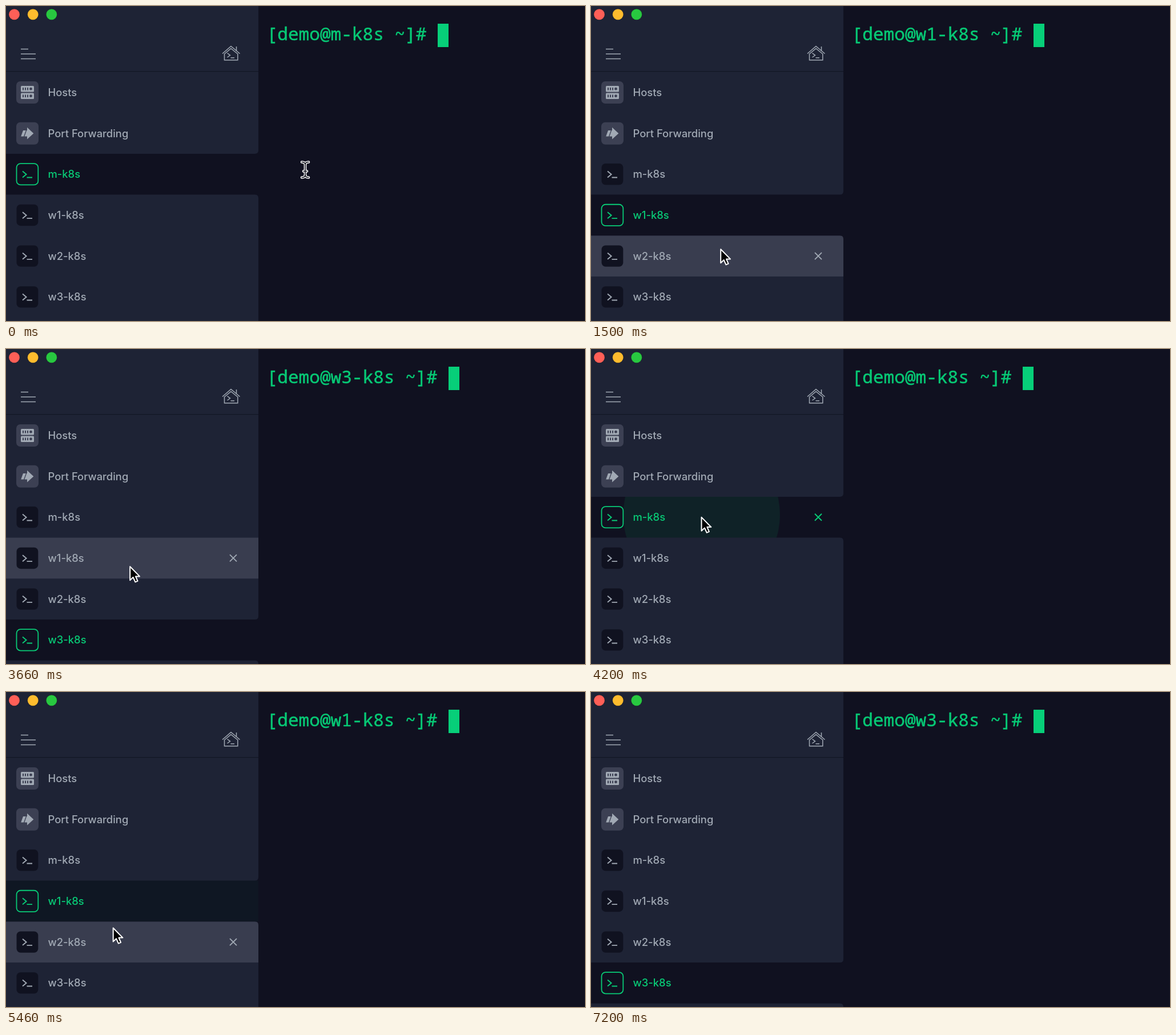
These frames come from a looping animation (1014 by 552 pixels, 7260 ms). An HTML page:

```html
<!DOCTYPE html>
<html lang="en">
<head>
<meta charset="utf-8">
<title>Terminal tabs</title>
<style>
  html, body { margin: 0; width: 100%; height: 100%; overflow: hidden; background: #101120; }
  svg { display: block; width: 100vw; height: 100vh; }
  .label { font: 500 18.4px Inter, sans-serif; fill: currentColor; }
  .prompt {
    font: 400 31.1px "Noto Sans Mono", monospace; white-space: pre;
    fill: #07c975; stroke: #07c975; stroke-width: 0.5;
  }
  .line { fill: none; stroke: currentColor; stroke-width: 1.9; }
  .thin { stroke-width: 1.5; }
  .lights circle { stroke: #000; stroke-opacity: 0.15; }
  .row { color: #a1a9b4; }
  .row .tile { fill: #101220; stroke: none; }
  .row.active { color: #08cb76; }
  .row.active .tile { fill: none; stroke: currentColor; stroke-width: 1.8; }
  .row .close { visibility: hidden; }
  .row.hover .close { visibility: visible; }
</style>
</head>
<body>
<svg viewBox="0 0 1014 552">
  <defs>
    <clipPath id="rowClip"><rect id="clipBox" width="442" height="71.7"/></clipPath>
  </defs>
  <rect width="1014" height="552" fill="#101120"/>
  <rect width="442" height="552" fill="#1e2335"/>
  <rect y="114" width="442" height="1.3" fill="#131725"/>
  <g class="lights">
    <circle cx="14.5" cy="14.8" r="9.5" fill="#ff5f57"/>
    <circle cx="47.2" cy="14.8" r="9.5" fill="#febc2e"/>
    <circle cx="79.8" cy="14.8" r="9.5" fill="#28c840"/>
  </g>

  <g color="#a1a9b4">
    <path class="line thin" d="M26 75.5H39M26 84H52M26 92.5H52"/>
    <path class="line thin" d="M379 83.5L394 70.5L409.5 83.5M403.5 78V71"/>
    <path class="line thin" d="M382.5 94.8V84L394 74.5L405.8 84V94.8Z"/>
    <path class="line thin" d="M387.5 82.5L392.5 86.3L387.5 90M393.5 90.8H400"/>
    <rect x="18" y="132" width="39" height="39" rx="7" fill="#3c4053"/>
    <g id="servers"></g>
    <text class="label" x="73.5" y="158">Hosts</text>
    <rect x="18" y="203.7" width="39" height="39" rx="7" fill="#3c4053"/>
    <path d="M30 218H34.8L31 228.5H26.2ZM36.2 218H37V212.8L48.3 223.2L37 233.6V228.5H32.4Z" fill="currentColor"/>
    <text class="label" x="73.5" y="229.7">Port Forwarding</text>
  </g>

  <rect id="hoverBox" width="442" height="71.7" fill="#393d4f"/>
  <path id="notch" d="M0 0H436Q442 0 442 -6H444V77.7H442Q442 71.7 436 71.7H0Z" fill="#101120"/>
  <g clip-path="url(#rowClip)"><circle id="ripple" fill="#00cc78"/></g>
  <g id="rows"></g>

  <text class="prompt" id="prompt" x="456.6" y="60"></text>
  <rect id="block" y="31" width="19" height="41" fill="#07cf79"/>

  <path id="arrow" d="M1.2 2.3V26.2L6.6 21L10.4 29.4L14.6 27.6L11 19.4H18Z"
        fill="#000" stroke="#fff" stroke-width="2" stroke-linejoin="round"/>
  <g id="beam" fill="none" stroke-linecap="round">
    <path id="beamOuter" stroke="#fff" stroke-width="4.6"/>
    <path id="beamInner" stroke="#10121c" stroke-width="1.6"/>
  </g>
</svg>
<script>
const LOOP = 7260, STEP = 60;
const ROW_H = 71.7, FIRST_TOP = 258.9, SIDEBAR = 442;
const PROMPT_X = 457.6, CHAR_W = 18.66;
const hosts = ["m-k8s", "w1-k8s", "w2-k8s", "w3-k8s"];

// [time, row]
const clicks = [[900, 1], [1980, 2], [2940, 3], [4080, 0], [5040, 1], [5880, 2], [6660, 3]];

// [time, x, y] of the pointer tip
const track = [
  [0, 524, 287], [180, 516, 290], [840, 240, 368], [1080, 228, 374],
  [1500, 226, 424], [1860, 223, 437], [2580, 223, 437], [2880, 222, 504],
  [3180, 222, 504], [3660, 216, 379], [4020, 194, 290], [4260, 192, 293],
  [4620, 184, 365], [5220, 184, 372], [5760, 190, 466], [5900, 191, 470],
  [6120, 191, 511], [6720, 192, 515], [7020, 193, 570], [LOOP, 193, 570]
];

const $ = id => document.getElementById(id);
const rowTop = i => FIRST_TOP + i * ROW_H;
const move = (el, x, y) => el.setAttribute("transform", `translate(${x} ${y})`);
const show = (el, on) => el.setAttribute("visibility", on ? "visible" : "hidden");

$("servers").innerHTML = [140, 152.5].map(y => `
  <rect x="26" y="${y}" width="23" height="10.5" rx="1.5" fill="currentColor"/>
  <path d="M30 ${y + 3}v4.5M34 ${y + 3}v4.5M38 ${y + 3}v4.5" stroke="#3c4053" stroke-width="2"/>
  <circle cx="43.5" cy="${y + 5.2}" r="2.4" fill="#3c4053"/>`).join("");

$("rows").innerHTML = hosts.map((name, i) => `
  <g class="row" transform="translate(0 ${rowTop(i) + ROW_H / 2})">
    <rect class="tile" x="18.5" y="-18.7" width="37.8" height="37.4" rx="7"/>
    <path class="line" d="M29 -5.3L35.6 0.2L29 5.7M36.5 5.7H46"/>
    <text class="label" x="73.5" y="6.5">${name}</text>
    <path class="line close" d="M392 -6L404 6M404 -6L392 6"/>
  </g>`).join("");
const rows = [...$("rows").children];

const beamPath = "M-6 -13.5Q0 -13.5 0 -9V9Q0 13.5 -6 13.5M6 -13.5Q0 -13.5 0 -9M0 9Q0 13.5 6 13.5M-3 2.5H3";
for (const id of ["beamOuter", "beamInner"]) $(id).setAttribute("d", beamPath);

function pointerAt(t) {
  const i = track.findIndex(key => key[0] > t);
  const [t0, x0, y0] = track[i - 1], [t1, x1, y1] = track[i];
  const p = (t - t0) / (t1 - t0), e = p * p * (3 - 2 * p);
  return [x0 + (x1 - x0) * e, y0 + (y1 - y0) * e];
}

function drawRipple(t, click) {
  const p = click ? (t - click[0]) / 500 : 1;
  show($("ripple"), p < 1);
  if (p >= 1) return;
  const [x, y] = pointerAt(click[0]);
  $("ripple").setAttribute("cx", x);
  $("ripple").setAttribute("cy", y);
  $("ripple").setAttribute("r", 325 * (1 - (1 - p) ** 2));
  $("ripple").setAttribute("opacity", 0.085 * Math.min(1, (1 - p) / 0.4));
}

function draw(t) {
  const click = clicks.filter(c => c[0] <= t).pop();
  const active = click ? click[1] : 0;
  const [x, y] = pointerAt(t);
  const inSidebar = x < SIDEBAR;
  const hover = inSidebar ? Math.floor((y - FIRST_TOP) / ROW_H) : -1;

  rows.forEach((row, i) => {
    row.classList.toggle("active", i === active);
    row.classList.toggle("hover", i === hover);
  });
  show($("hoverBox"), hover >= 0 && hover < hosts.length && hover !== active);
  $("hoverBox").setAttribute("y", rowTop(hover));
  $("clipBox").setAttribute("y", rowTop(active));
  move($("notch"), 0, rowTop(active));
  drawRipple(t, click);

  const text = `[demo@${hosts[active]} ~]# `;
  $("prompt").textContent = text;
  $("block").setAttribute("x", Math.round(PROMPT_X + text.length * CHAR_W));

  show($("arrow"), inSidebar);
  show($("beam"), !inSidebar);
  move($("arrow"), x, y);
  move($("beam"), x, y);
}

const start = performance.now();
function tick() {
  const t = (performance.now() - start) % LOOP;
  draw(Math.floor(t / STEP) * STEP);
  requestAnimationFrame(tick);
}
tick();
</script>
</body>
</html>
```
